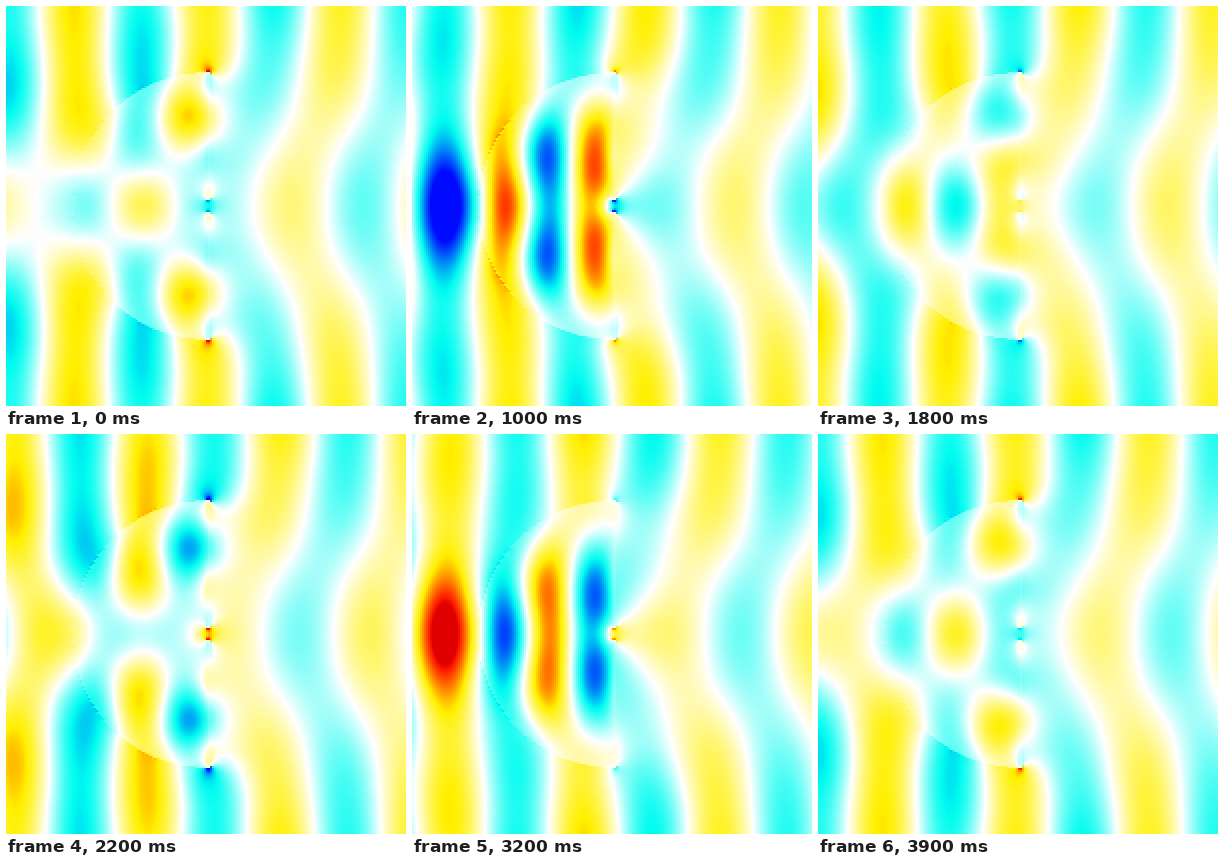
Write a matplotlib script that moves like this. It is 400 px wide and 400 px high and loops after 4 s.

```python
"""Plane wave hitting a glass half cylinder whose flat face carries a thin metal film with a slit."""
import numpy as np
import matplotlib.pyplot as plt
from matplotlib.animation import FuncAnimation
from matplotlib.colors import LinearSegmentedColormap

SIZE = 400
FRAMES = 40
INTERVAL = 100

MID = SIZE / 2
WAVELENGTH = SIZE / 3
RADIUS = WAVELENGTH
FILM = 4            # film thickness
SLIT = 6            # half width of the slit
GLASS = 1.5**2
METAL = -24 + 1.5j

STEP = 2            # mesh cell in pixels
PAD = 20            # absorbing cells on each outer side
ABSORB = 8
K = 2 * np.pi / WAVELENGTH

CELLS = SIZE // STEP
NX = CELLS + 2 * PAD
NY = CELLS // 2 + PAD   # the field is symmetric, so only one half is solved

STOPS = [
    (-1.0, (0, 10, 255)), (-0.5, (0, 252, 240)), (0.0, (255, 255, 255)),
    (0.5, (255, 240, 0)), (0.93, (255, 30, 0)), (1.0, (225, 0, 0)),
]
CMAP = LinearSegmentedColormap.from_list(
    "wave", [((v + 1) / 2, np.array(c) / 255) for v, c in STOPS], N=512)


def permittivity(x, d):
    """Material at horizontal place x and distance d from the axis."""
    x, d = np.meshgrid(x, d, indexing="ij")
    eps = np.ones(x.shape, complex)
    eps[(x <= MID) & (np.hypot(x - MID, d) < RADIUS)] = GLASS
    eps[(x > MID) & (x <= MID + FILM) & (d > SLIT) & (d < RADIUS)] = METAL
    return eps


def stretch(pos, low, high):
    """Complex coordinate stretch that absorbs waves outside low..high."""
    depth = np.maximum(np.maximum(low - pos, pos - high), 0) / (PAD * STEP)
    return 1 + 1j * ABSORB * depth**2


def solve_blocks(lower, diag, upper, rhs):
    """Block tridiagonal elimination, one mesh column at a time."""
    n = len(rhs)
    gains, parts = [], []
    for i in range(n):
        block, r = diag(i), rhs[i]
        if i:
            block = block - lower[i][:, None] * gains[-1]
            r = r - lower[i] * parts[-1]
        sol = np.linalg.solve(block, np.column_stack([np.diag(upper[i]), r]))
        gains.append(sol[:, :-1])
        parts.append(sol[:, -1])
    out = np.zeros_like(rhs)
    out[-1] = parts[-1]
    for i in range(n - 2, -1, -1):
        out[i] = parts[i] - gains[i] @ out[i + 1]
    return out


def electric_field():
    """Complex vertical electric field on the visible mesh."""
    x_face = STEP * (np.arange(NX + 1) - PAD) + STEP / 2
    x_cell = x_face[:-1] + STEP / 2
    d_face = STEP * np.arange(NY + 1.0)
    d_cell = d_face[:-1] + STEP / 2

    inv_x = 1 / permittivity(x_face, d_cell)
    inv_y = 1 / permittivity(x_cell, d_face)
    flow_x = inv_x / stretch(x_face, 0, SIZE)[:, None]
    flow_y = inv_y / stretch(d_face, 0, MID)
    flow_y[:, 0] = 0    # mirror axis
    sx = stretch(x_cell, 0, SIZE)[:, None]
    sy = stretch(d_cell, 0, MID)

    lower, upper = flow_x[:-1] / sx, flow_x[1:] / sx
    down, up = flow_y[:, :-1] / sy, flow_y[:, 1:] / sy
    centre = (K * STEP)**2 - lower - upper - down - up

    def diag(i):
        return (np.diag(centre[i]) + np.diag(up[i, :-1], 1)
                + np.diag(down[i, 1:], -1))

    x_wide = np.append(x_cell[0] - STEP, np.append(x_cell, x_cell[-1] + STEP))
    incident = np.exp(1j * K * (x_wide - MID))
    slope = np.diff(incident)[:, None]
    rhs = -np.diff((inv_x - 1) * slope, axis=0) / sx

    scattered = solve_blocks(lower, diag, upper, rhs)
    scattered = np.pad(scattered, ((1, 1), (0, 0)))
    e = inv_x * (slope + np.diff(scattered, axis=0)) / (1j * K * STEP)
    half = e[PAD:PAD + CELLS, :CELLS // 2].T
    return np.vstack([half[::-1], half])


wave = electric_field() / 2


def snapshot(i):
    return (wave * np.exp(-2j * np.pi * i / FRAMES)).real


fig = plt.figure(figsize=(4, 4), dpi=100)
ax = fig.add_axes([0, 0, 1, 1])
ax.axis("off")
image = ax.imshow(snapshot(0), cmap=CMAP, vmin=-1, vmax=1,
                  interpolation="nearest", aspect="auto")


def update(i):
    image.set_data(snapshot(i))
    return [image]


anim = FuncAnimation(fig, update, frames=FRAMES, interval=INTERVAL,
                     repeat=True, repeat_delay=0, blit=False)
plt.show()
```
